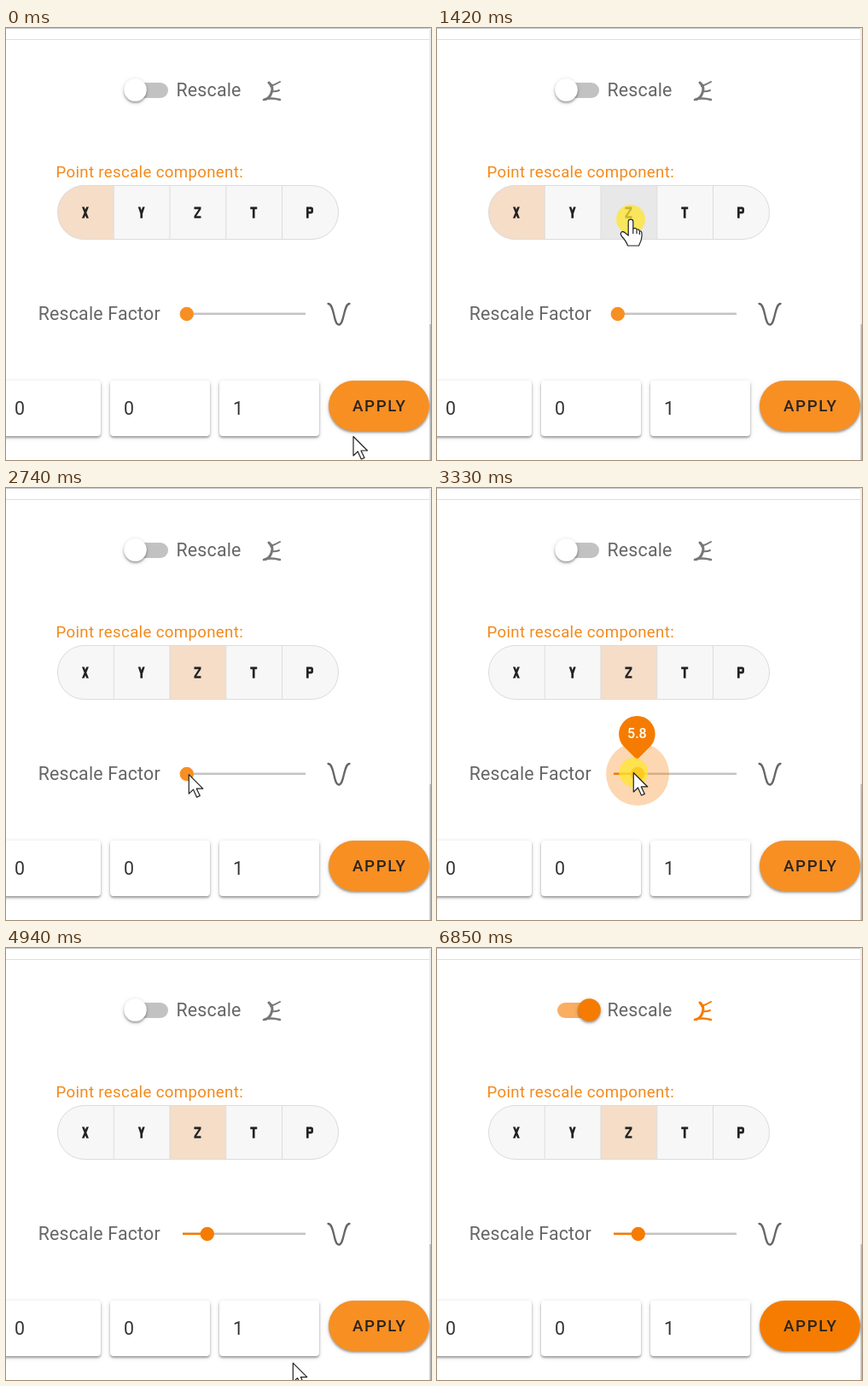
An HTML page for the animation above (7180 ms loop, 498 by 506 pixels).

```html
<!DOCTYPE html>
<html lang="en">
<head>
<meta charset="utf-8">
<style>
html, body { margin: 0; width: 100%; height: 100%; overflow: hidden; background: #fff; }
svg { display: block; width: 498px; height: 506px; }
text { font-family: Roboto, "Open Sans", sans-serif; }
.label { font-size: 21.33px; letter-spacing: .2px; fill: #666; }
.field { font-size: 21.33px; fill: #333; }
.card { filter: drop-shadow(0 2px 1.2px rgba(0,0,0,.3)) drop-shadow(0 1px 2.5px rgba(0,0,0,.16)); }
.line { fill: none; stroke-linecap: round; }
</style>
</head>
<body>
<svg viewBox="0 0 498 506">
  <rect width="498" height="506" fill="#fff"/>
  <path d="M0 .5H498" stroke="#c8c8c8"/>
  <path d="M0 13.5H496" stroke="#dedede"/>
  <rect x="496" width="2" height="506" fill="#ececec"/>
  <rect x="496.5" y="347" width="1.5" height="159" fill="#b5b5b5"/>

  <rect id="switchTrack" x="141" y="64" width="49" height="18" rx="9"/>
  <circle id="ripple" cy="73" fill="#f57c00"/>
  <circle id="knob" class="card" cy="72.5" r="13.3"/>
  <text class="label" x="199.5" y="80">Rescale</text>
  <g id="curveIcon" class="line">
    <path d="M308 64Q314 69 311 76Q309 82 304 83.5" stroke-width="3"/>
    <path d="M310 68Q316 66 321 63M311 74Q316 75 320 73" stroke-width="2"/>
    <path d="M302 84Q310 81 321 84" stroke-width="2.6"/>
  </g>

  <text x="58.5" y="175" font-size="18.67" letter-spacing=".333" fill="#f28a1c">Point rescale component:</text>
  <clipPath id="pill"><rect x="60" y="184" width="330" height="64" rx="32"/></clipPath>
  <g id="cells" clip-path="url(#pill)"></g>
  <rect x="60.5" y="184.5" width="329" height="63" rx="31.5" fill="none" stroke="#dcdcdc"/>
  <g id="letters"></g>

  <text class="label" x="37.7" y="342">Rescale Factor</text>
  <path d="M207 334.8H351" stroke="#c4c4c4" stroke-width="2.4"/>
  <path id="filled" stroke="#f57c00" stroke-width="2.4"/>
  <circle id="halo" cy="335" fill="#f57c00" opacity=".3"/>
  <circle id="thumb" cy="335" r="8.2"/>
  <g id="balloon">
    <path d="M-15 -15A21.3 21.3 0 1 1 15 -15L0 0Z" fill="#f57c00"/>
    <text id="value" y="-25" text-anchor="middle" font-size="16" font-weight="500" fill="#fff"></text>
  </g>
  <path class="line" d="M377.5 323C385 323 383.5 347.5 390 347.5S395.500 323 402.500 323" stroke="#666" stroke-width="2.3"/>

  <g id="fields"></g>
  <rect id="apply" class="card" x="378" y="413" width="118" height="59" rx="29.5"/>
  <text x="406" y="449" font-size="18.67" font-weight="500" letter-spacing="1.67" fill="#2b2420">APPLY</text>

  <circle id="press" r="17" fill="#ffe62e" opacity=".75"/>
  <g id="cursor" fill="#fff" stroke="#222" stroke-width="1.2" stroke-linejoin="round">
    <path id="arrow" d="M0 .5V23L5.200 18L9.300 27L13 25.400L9 17H16.500Z"/>
    <g id="hand">
      <path d="M-2.800 2.500C-2.800 -.7 2.800 -.7 2.800 2.500V11Q5.500 9.500 7 12Q9.500 11.500 10.300 13.500Q13 13.500 13 17V20Q12.800 25 9.500 31H-3.500Q-5 26 -10.500 20C-13.500 16 -10 12.500 -6.500 16L-2.800 19Z"/>
      <path d="M2.800 11V17M7 12.500V17M10.300 14V18" fill="none"/>
    </g>
  </g>
</svg>
<script>
const LOOP = 7180, ORANGE = '#f57c00', SOFT = '#f78f23';
const CELL = 65.75;
const $ = id => document.getElementById(id);
const set = (el, attrs) => { for (const k in attrs) el.setAttribute(k, attrs[k]); };
const add = (parent, tag, attrs) => {
  const el = document.createElementNS('http://www.w3.org/2000/svg', tag);
  set(el, attrs);
  return parent.appendChild(el);
};
const ramp = (t, a, b) => Math.min(1, Math.max(0, (t - a) / (b - a)));
const ease = (t, a, b) => .5 - .5 * Math.cos(Math.PI * ramp(t, a, b));
const lerp = (a, b, p) => a + (b - a) * p;
const during = (t, a, b) => t >= a && t < b;
const mix = (a, b, p) => `rgb(${a.map((v, i) => Math.round(lerp(v, b[i], p)))})`;

const GLYPHS = [
  'M9 7L11 12L9 17H11L12 14.5L13 17H15L13 12L15 7H13L12 9.5L11 7Z',
  'M9 7L11 13V17H13V13L15 7H13L12 10L11 7Z',
  'M9 7V9H13L9 15V17H15V15H11L15 9V7Z',
  'M9 7V9H11V17H13V9H15V7Z',
  'M9 7V17H11V13H13A2 2 0 0 0 15 11V9A2 2 0 0 0 13 7ZM11 9H13V11H11Z'
];
const cells = GLYPHS.map((d, i) => {
  const x = 60.5 + i * CELL;
  const cell = add($('cells'), 'rect', { x, y: 184, width: CELL, height: 64 });
  if (i) add($('cells'), 'path', { d: `M${x} 184V248`, stroke: '#dcdcdc' });
  add($('letters'), 'path', {
    d, fill: '#222', 'fill-rule': 'evenodd',
    transform: `translate(${x + CELL / 2 - 16.4} 200.200) scale(1.333)`
  });
  return cell;
});
[[-20, '0'], [122, '0'], [250, '1']].forEach(([x, digit]) => {
  add($('fields'), 'rect', { class: 'card', x, y: 413, width: x < 0 ? 131 : 117, height: 65, rx: 4, fill: '#fff' });
  add($('fields'), 'text', { class: 'field', x: x < 0 ? 10 : x + 16, y: 453 }).textContent = digit;
});

// Cursor moves: start, end, target point, optional bend point
const START = [407, 478];
const MOVES = [
  [20, 670, [166, 225]],
  [840, 1120, [227, 224]],
  [1690, 2110, [358, 397], [235, 339]],
  [2260, 2820, [207, 332]],
  [2940, 3380, [231, 333]],
  [4430, 5180, [389, 502], [264, 481]],
  [5630, 6030, [180, 72], [505, 330]],
  [6060, 6760, [400, 512], [280, 318]]
];
const PRESSES = [[1400, 1510], [2880, 3540], [6040, 6130]];

function cursorAt(t) {
  let from = START;
  for (const [a, b, to, bend] of MOVES) {
    if (t < a) break;
    if (t < b) {
      const p = ease(t, a, b), q = 1 - p;
      return from.map((v, i) => bend
        ? q * q * v + 2 * p * q * bend[i] + p * p * to[i]
        : lerp(v, to[i], p));
    }
    from = to;
  }
  return from;
}

function drawCells(t, x, y) {
  const hovered = y > 184 && y < 248 ? Math.floor((x - 60.5) / CELL) : -1;
  const chosen = ease(t, 1420, 1620);
  cells.forEach((cell, i) => {
    const level = i === 0 ? 1 - chosen : i === 2 ? chosen : 0;
    const base = i === hovered ? [232, 232, 232] : [247, 247, 247];
    cell.setAttribute('fill', mix(base, [245, 221, 200], level));
  });
  return hovered >= 0 && hovered < 5;
}

function drawSlider(t) {
  const amount = lerp(1, 6, ease(t, 2940, 3380));
  const x = 207 + amount * 4.8;
  const hover = ease(t, 2700, 2860) - ease(t, 4450, 4700);
  const active = ease(t, 2880, 3060) - ease(t, 3560, 3860);
  const label = ease(t, 2860, 3040) - ease(t, 3520, 3710);
  set($('filled'), { d: `M207 334.8H${x}` });
  set($('halo'), { cx: x, r: Math.max(0, 24 * hover + 13 * active) });
  set($('thumb'), { cx: x, fill: t < 2880 ? SOFT : ORANGE });
  set($('balloon'), { transform: `translate(${x - .7} 318.300) scale(${label})` });
  $('value').textContent = amount.toFixed(1);
}

function drawSwitch(t) {
  const on = ease(t, 6130, 6430);
  const lit = t >= 6120;
  set($('switchTrack'), { fill: lit ? ORANGE : '#c2c2c2', opacity: lit ? lerp(.8, .62, ramp(t, 6250, 6450)) : 1 });
  set($('knob'), { cx: lerp(151.5, 178.500, on), fill: mix([255, 255, 255], [245, 124, 0], ramp(t, 6230, 6400)) });
  set($('ripple'), {
    cx: lit ? 179 : 151.5,
    r: 28 * ease(t, 5980, 6120),
    opacity: .42 * (1 - ramp(t, 6300, 6560))
  });
  set($('curveIcon'), { stroke: t < 6370 ? '#777' : ORANGE });
  set($('apply'), { fill: mix([247, 143, 35], [245, 124, 0], ramp(t, 6370, 6560)) });
}

function draw(t) {
  const [x, y] = cursorAt(t);
  const overCells = drawCells(t, x, y);
  const overSwitch = x > 137 && x < 277 && y > 55 && y < 92;
  const overApply = x > 380 && y > 413 && y < 472;
  const pointing = overCells || overSwitch || overApply;
  drawSlider(t);
  drawSwitch(t);
  set($('cursor'), { transform: `translate(${x} ${y})` });
  set($('arrow'), { visibility: pointing ? 'hidden' : 'visible' });
  set($('hand'), { visibility: pointing ? 'visible' : 'hidden' });
  const pressed = PRESSES.some(([a, b]) => during(t, a, b));
  set($('press'), { cx: x, cy: y, visibility: pressed ? 'visible' : 'hidden' });
}

const begin = performance.now();
function tick() {
  draw((performance.now() - begin) % LOOP);
  requestAnimationFrame(tick);
}
tick();
</script>
</body>
</html>
```
